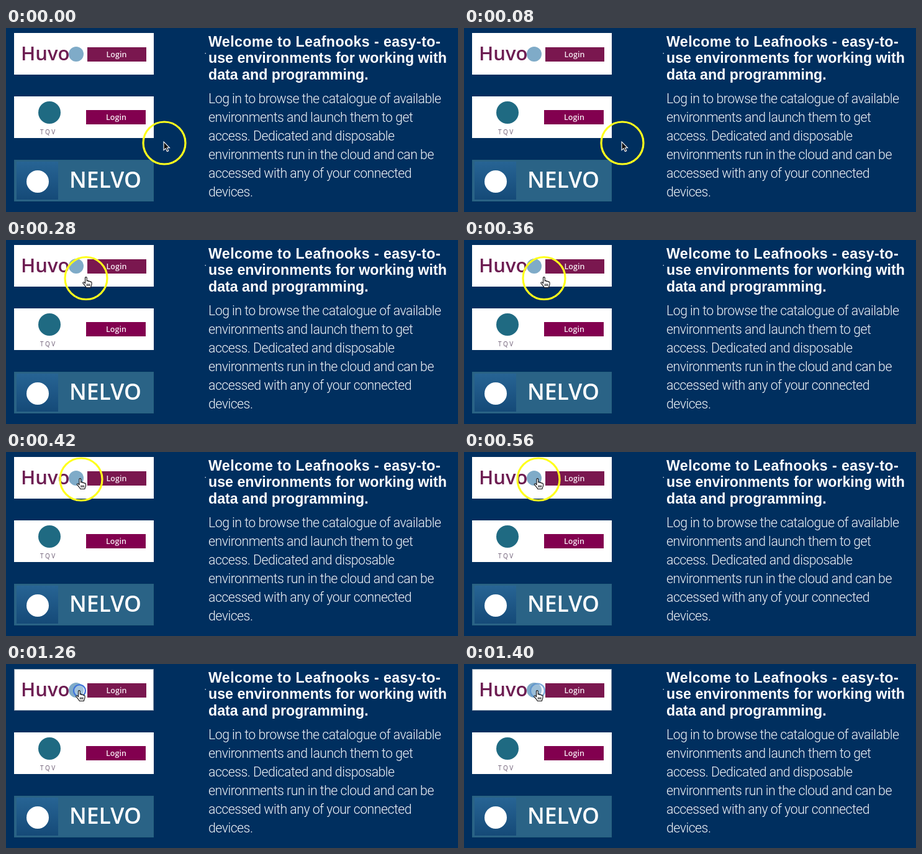
An HTML page for the animation above (1.5 s loop, 728x296 px).

```html
<!DOCTYPE html>
<html lang="en">
<head>
<meta charset="utf-8">
<title>Login page</title>
<style>
  html, body { margin: 0; width: 100%; height: 100%; overflow: hidden; background: #002f5f; }
  svg { display: block; width: 728px; height: 296px; }
  .head { font: 700 23.2px "Liberation Sans", Arial, sans-serif; fill: #fff; }
  .body { font: 300 21.3px Roboto, "Liberation Sans", sans-serif; letter-spacing: -.52px; fill: #f2f5f9; }
  .login { font: 600 12.5px "Open Sans", sans-serif; fill: #f6e9f1; text-anchor: middle; }
  .brand { font: 600 31px "Open Sans", sans-serif; fill: #6d1d52; }
  .small { font: 400 10px "Open Sans", sans-serif; letter-spacing: 2.6px; fill: #6c5c74; }
  .wide { font: 600 35.5px "Open Sans", sans-serif; fill: #fff; }
</style>
</head>
<body>
<svg viewBox="0 0 728 296">
  <defs>
    <linearGradient id="panel" x2="0" y2="1">
      <stop offset="0" stop-color="#276494"/>
      <stop offset="1" stop-color="#154a78"/>
    </linearGradient>
  </defs>
  <rect width="728" height="296" fill="#002f5f"/>

  <g>
    <rect x="13" y="8" width="225" height="67" fill="#fff"/>
    <circle cx="113" cy="42" r="12" fill="#7fabc8"/>
    <text class="brand" x="24" y="52">Huvo</text>
    <rect x="131" y="31" width="95" height="23" fill="#7a174f"/>
    <text class="login" x="178" y="46.5">Login</text>
    <rect id="focus" x="13.5" y="8.5" width="224" height="66" fill="none" stroke="#23405f" stroke-dasharray="1 1"/>
  </g>

  <g>
    <rect x="13" y="110" width="225" height="67" fill="#fff"/>
    <circle cx="70" cy="136" r="18" fill="#1f6a82"/>
    <text class="small" x="55" y="170.5">TQV</text>
    <rect x="129" y="132" width="96" height="23" fill="#82004f"/>
    <text class="login" x="177.5" y="147.5">Login</text>
  </g>

  <g>
    <rect x="13" y="212" width="225" height="67" fill="#28627f"/>
    <rect x="14" y="213" width="223" height="65" fill="#2a6386"/>
    <rect x="17" y="215" width="67" height="61" fill="url(#panel)"/>
    <circle cx="51" cy="247" r="18" fill="#fff"/>
    <text class="wide" x="102" y="257">NELVO</text>
  </g>

  <rect x="320.5" y="40" width="1.5" height="1.5" fill="#c3cfdc"/>
  <g id="copy"></g>

  <circle id="halo" r="34" fill="none" stroke="#ffff1c" stroke-width="3.2"/>
  <circle id="click" cx="118.5" cy="43"/>
  <path id="arrow" d="M0 0V13.5L3.1 10.6 5.4 15.6 7.7 14.6 5.5 9.8H9.5Z" fill="#0b0b0f" stroke="#fff" stroke-width="1.1"/>
  <g id="hand" stroke="#0b0b0f" stroke-width="1.1" stroke-linejoin="round">
    <path fill="#fff" d="M4.5 1.8C4.5 .2 7.2 .2 7.2 1.8V7C7.6 6 9.8 6.2 9.9 7.6 10.6 6.8 12.4 7 12.5 8.4 13.4 7.8 15 8.2 15 9.8V12C15 14 13.6 15 13.4 17.5H6.2C5.6 15.5 2.5 12.5 1 10.6 .2 9.4 1.8 8.2 3 9.2L4.5 10.8Z"/>
    <path fill="none" d="M7.5 11.5v3.5M9.6 11.5v3.5M11.7 11.5v3.5"/>
  </g>
</svg>
<script>
const LOOP = 1500;
const $ = id => document.getElementById(id);

function addLine(cls, y, text, spacing) {
  const line = document.createElementNS("http://www.w3.org/2000/svg", "text");
  line.setAttribute("class", cls);
  line.setAttribute("x", 326);
  line.setAttribute("y", y);
  if (spacing) line.style.letterSpacing = spacing + "px";
  line.textContent = text;
  $("copy").append(line);
}

addLine("head", 30, "Welcome to Leafnooks - easy-to-", .4);
addLine("head", 56, "use environments for working with");
addLine("head", 83, "data and programming.");
[
  "Log in to browse the catalogue of available",
  "environments and launch them to get",
  "access. Dedicated and disposable",
  "environments run in the cloud and can be",
  "accessed with any of your connected",
  "devices."
].forEach((text, i) => addLine("body", 120.5 + 30 * i, text));

// The pointer jumps between these places; halo is the ring's centre.
const steps = [
  { at: 0, pointer: "arrow", pos: [254, 183], halo: [255, 185] },
  { at: 140, pointer: "arrow", pos: [155, 89], halo: [155.5, 91] },
  { at: 280, pointer: "hand", pos: [123, 59], halo: [129, 61.5] },
  { at: 420, pointer: "hand", pos: [113.5, 42], halo: [121, 44] },
  { at: 560, pointer: "hand", pos: [112.5, 42], halo: [120, 44] },
  { at: 1260, pointer: "hand", pos: [112, 42], click: { r: 9.5, stroke: "#3d72dc", opacity: 1 } },
  { at: 1400, pointer: "hand", pos: [112, 42], click: { r: 11.5, stroke: "#5a92d0", opacity: .8 } }
];

const show = (el, on) => el.setAttribute("visibility", on ? "visible" : "hidden");
const move = (el, [x, y]) => el.setAttribute("transform", `translate(${x} ${y})`);

function draw(time) {
  const step = steps.findLast(s => s.at <= time);
  for (const id of ["arrow", "hand"]) show($(id), id === step.pointer);
  move($(step.pointer), step.pos);
  show($("halo"), step.halo);
  if (step.halo) move($("halo"), step.halo);
  show($("click"), step.click);
  show($("focus"), step.click);
  if (step.click) {
    const ring = $("click");
    ring.setAttribute("r", step.click.r);
    ring.setAttribute("stroke", step.click.stroke);
    ring.setAttribute("stroke-width", 2.2);
    ring.setAttribute("fill", "#cfe0f4");
    ring.setAttribute("fill-opacity", .45);
    ring.setAttribute("opacity", step.click.opacity);
  }
}

const start = performance.now();
function tick() {
  draw((performance.now() - start) % LOOP);
  requestAnimationFrame(tick);
}
tick();
</script>
</body>
</html>
```
